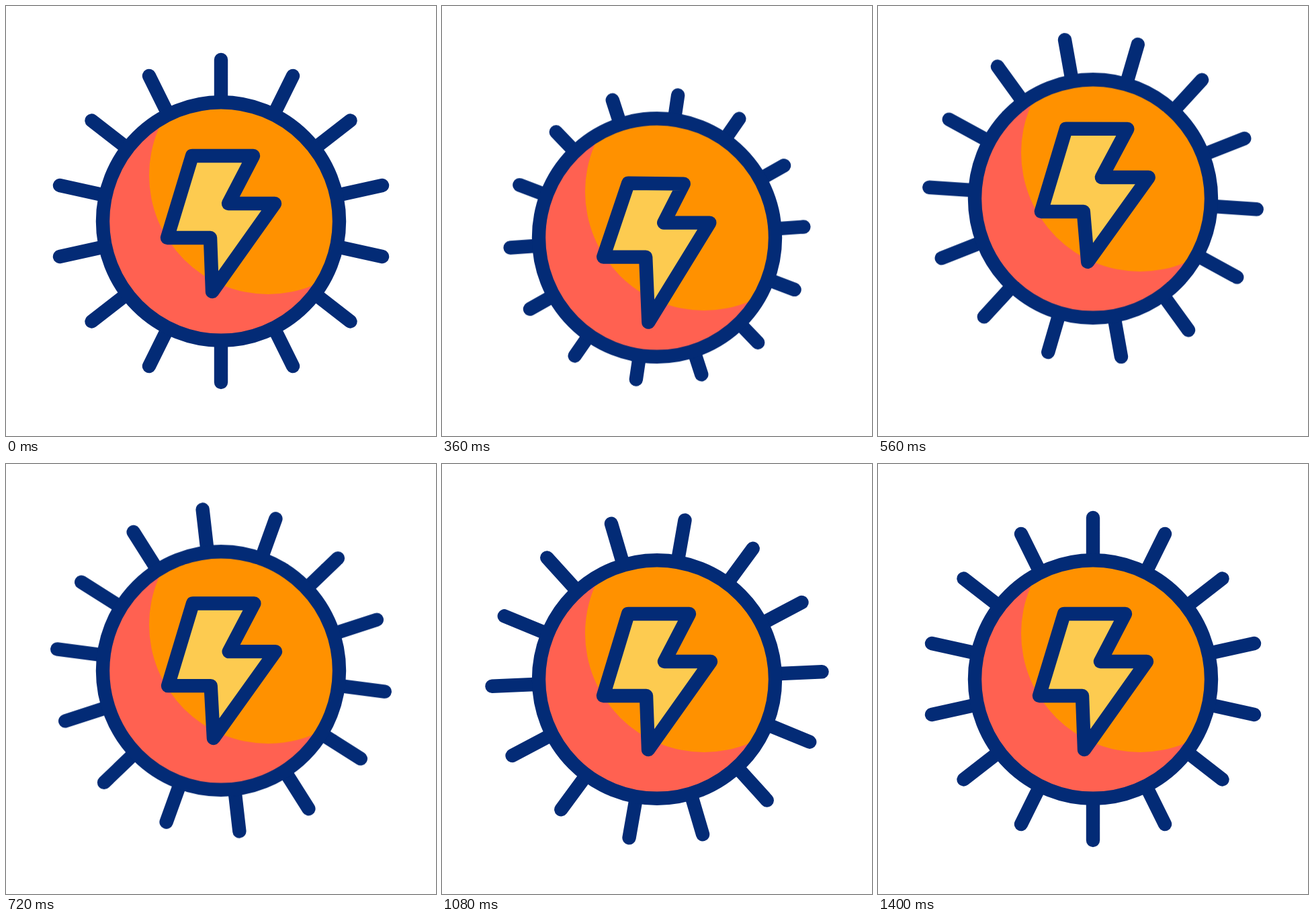
Recreate the animation shown at these times as an HTML page without scripts. Size 640x640 px, loop 1480 ms.

```html
<!DOCTYPE html>
<html lang="en">
<head>
<meta charset="utf-8">
<title>Solar energy</title>
<style>
  html, body {
    margin: 0;
    width: 100%;
    height: 100%;
    overflow: hidden;
    background: #fff;
  }

  svg {
    display: block;
    width: 100vw;
    height: 100vh;
    --navy: #032b76;
    --ease: cubic-bezier(.333, 0, .667, 1);
  }

  .sun, .rays, .bolt {
    animation: 1480ms var(--ease) infinite;
  }

  .rays, .ring, .bolt {
    fill: none;
    stroke: var(--navy);
    stroke-width: 20.4;
    stroke-linecap: round;
    stroke-linejoin: round;
  }

  .sun { animation-name: hop; }

  .rays {
    vector-effect: non-scaling-stroke;
    transform-origin: 320px 320px;
    animation-name: swing, retract;
  }

  .bolt {
    fill: #fdcb50;
    animation-name: flex;
  }

  /* crouch at 320 ms, leap at 600 ms, settle by 800 ms */
  @keyframes hop {
    0%, 2.703%, 54.054%, 100% { transform: translateY(0); }
    21.622% { transform: translateY(28px); }
    40.541% { transform: translateY(-37.2px); }
  }

  @keyframes retract {
    0%, 2.703%, 40.541%, 100% { scale: 1; }
    21.622% { scale: .884; }
  }

  @keyframes swing {
    0%, 2.703%, 94.595%, 100% { rotate: 0deg; }
    51.351% { rotate: 20deg; }
  }

  @keyframes flex {
    0%, 2.703%, 54.054%, 100% {
      d: path("M277 223L368 223L331 294L400 294L307 425L304 345L240 345Z");
    }
    21.622% {
      d: path("M277 269L359 270L330 327L398 327L307 476.5L303 378L240 378Z");
    }
    40.541% {
      d: path("M280 178L372 178L333 251L403 251L312.5 375.5L306 302L243 302Z");
    }
  }
</style>
</head>
<body>
<svg viewBox="0 0 640 640">
  <clipPath id="disc"><ellipse cx="320" cy="320.5" rx="176" ry="177.3"/></clipPath>
  <g class="sun">
    <path class="rays" d="M320 80V560M427 104L213 536M512.5 170.5L127.5 469.5M560 267L80 373M560 373L80 267M512.5 469.5L127.5 170.5M427 536L213 104"/>
    <g clip-path="url(#disc)">
      <rect x="140" y="140" width="360" height="360" fill="#ff6151"/>
      <circle cx="390" cy="252" r="177" fill="#ff9100"/>
    </g>
    <ellipse class="ring" cx="320" cy="320.5" rx="176" ry="177.3"/>
  </g>
  <path class="bolt" d="M277 223L368 223L331 294L400 294L307 425L304 345L240 345Z"/>
</svg>
</body>
</html>
```
